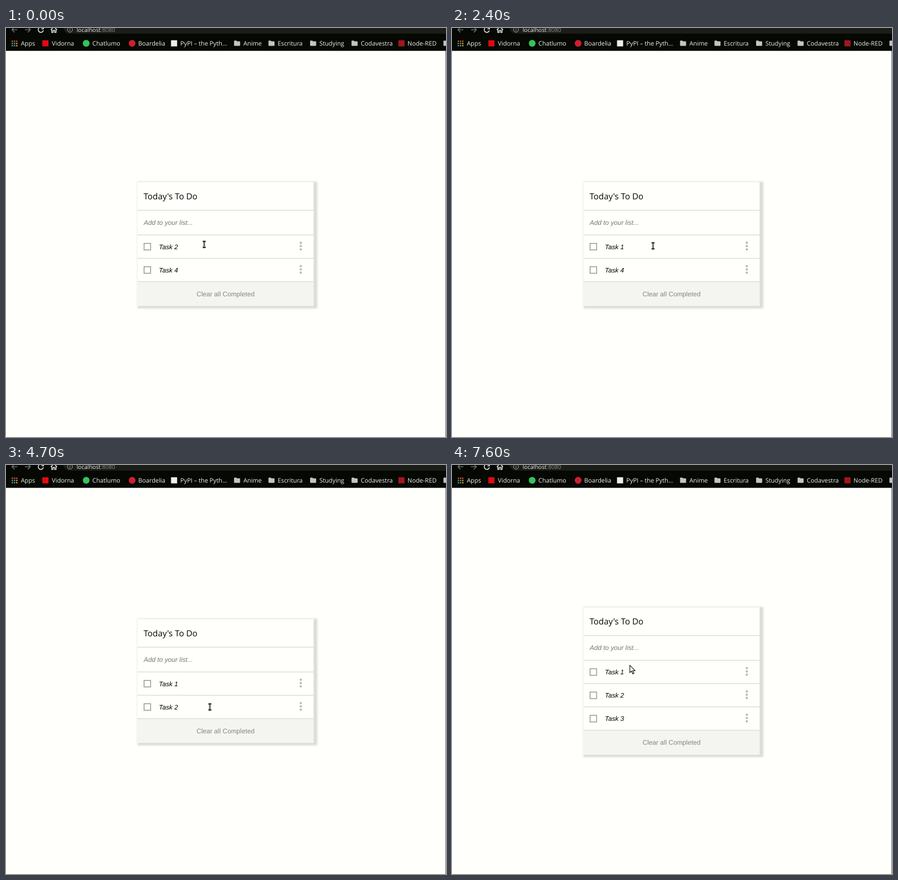
An HTML page for the animation above (8 s loop, 777x721 px).

```html
<!DOCTYPE html>
<html lang="en">
<head>
<meta charset="utf-8">
<title>To do list</title>
<style>
  html, body { margin: 0; width: 100%; height: 100%; overflow: hidden; background: #fffffb; }
  svg { display: block; width: 777px; height: 721px; }
  text { text-rendering: geometricPrecision; white-space: pre; }
  .ui { font: 500 10.8px "Open Sans", "Noto Sans", sans-serif; fill: #f2f2ee; }
  .url { font-size: 10.1px; font-weight: 400; }
  .title { font: 14.85px "Open Sans", "Noto Sans", sans-serif; }
  .item, .button { font: italic 11.67px "Liberation Sans", Arial, sans-serif; }
  .button { font-style: normal; fill: #858583; text-anchor: middle; }
  .hint { fill: #757573; }
  .shadow { fill: #dcddd9; filter: blur(1.7px); }
  .rule { fill: #dcddd9; }
  .icon { fill: #b9b9b5; }
  .box { fill: none; stroke: #94948f; stroke-width: 1.4; }
  .line { fill: none; stroke: #e6e6e2; stroke-width: 1.5; }
  .dim { stroke: #6c6d6a; }
</style>
</head>
<body>
<svg viewBox="0 0 777 721">
  <rect width="777" height="721" fill="#fffffb"/>
  <rect x="776" y="40" width="1" height="681" fill="#6b6b69"/>
  <rect width="777" height="40.3" fill="#050803"/>
  <rect x="101" y="-14" width="700" height="24" rx="12" fill="#1b1d19"/>
  <path class="line dim" d="M20 3H10.5M15-1.6L10.4 3L15 7.6M33.5 3H43M38.5-1.6L43.1 3L38.5 7.6"/>
  <path class="line" d="M64.8-.2A4.6 4.6 0 1 0 66 4.2M66.2-2V1.4H62.6"/>
  <path class="line" d="M79 3.2L84.6-2L90.2 3.2M80.8 2.5V7.7H83.2V4.2H86V7.7H88.4V2.5"/>
  <circle class="line" cx="113" cy="3" r="4.4" style="stroke:#a2a39f;stroke-width:1"/>
  <path d="M113 2.5V5.6M113 .4V1.5" stroke="#a2a39f" stroke-width="1.1"/>
  <text class="ui url" x="124.8" y="6.6">localhost<tspan fill="#92938f">:8080</tspan></text>
  <g id="bookmarks"></g>
  <g id="card"></g>
  <g id="pointer"></g>
</svg>
<script>
const LOOP = 8000, LEFT = 232.3, WIDTH = 310.9, ROW = 41.1, LIST_TOP = 364.8;
const $ = id => document.getElementById(id);
const rect = (x, y, w, h, attrs = '') =>
  `<rect x="${x}" y="${y}" width="${w}" height="${h}" ${attrs}/>`;
const label = (cls, x, y, s) => `<text class="${cls}" x="${x}" y="${y}">${s}</text>`;
const rule = y => rect(LEFT, y - 0.7, WIDTH, 1.4, 'class="rule"');

// Bookmarks bar
const folder = x =>
  `<path d="M${x} 23.2q0-1 1-1h3l1.3 1.4h4.4q1 0 1 1v6q0 1-1 1h-8.7q-1 0-1-1z" fill="#c4c5c1"/>`;
const disc = (x, color) => `<circle cx="${x}" cy="27" r="6" fill="${color}"/>`;
const square = (x, color) => rect(x, 21.6, 10.8, 10.8, `fill="${color}"`);
const appColors = ['#d9503f', '#d9503f', '#d9503f', '#45a35c', '#7a8f5a', '#d3a53a', '#45a35c', '#5b86c8', '#d3a53a'];
const apps = appColors.map((c, i) =>
  rect(10 + i % 3 * 3.9, 22.2 + Math.floor(i / 3) * 3.9, 2.4, 2.4, `fill="${c}"`)).join('');
const bookmarks = [
  [26.2, 'Apps', apps],
  [81, 'Vidorna', square(64.2, '#e00b12')],
  [152.6, 'Chatlumo', disc(141.6, '#35c45b')],
  [233.5, 'Boardelia', disc(222.7, '#cf1f30')],
  [307.8, 'PyPI – the Pyth…', square(291.4, '#eeeeea')],
  [419.2, 'Anime', folder(402.7)],
  [479.8, 'Escritura', folder(463.5)],
  [553.5, 'Studying', folder(537)],
  [626.5, 'Codavestra', folder(610.2)],
  [709, 'Node-RED', square(693, '#a3161c')],
  [790, '', folder(772.5)]
];
$('bookmarks').innerHTML = bookmarks.map(([x, s, icon]) => icon + label('ui', x, 30.7, s)).join('');

// Each step changes part of the state; pointer is [shape, x, y].
const steps = [
  [0, { tasks: ['Task 2', 'Task 4'], draft: '', caret: null, active: -1, pointer: ['beam', 350, 381.5] }],
  [200, { pointer: ['beam', 355, 384] }],
  [300, { caret: 0 }],
  [400, { active: 0 }],
  [900, { caret: null }],
  [1200, { tasks: ['Task ', 'Task 4'] }],
  [1600, { tasks: ['Task 1', 'Task 4'], caret: 0 }],
  [2300, { caret: null }],
  [2400, { active: -1 }],
  [3100, { pointer: ['beam', 355.5, 389] }],
  [3200, { pointer: ['beam', 357, 402] }],
  [3300, { pointer: ['beam', 359, 416] }],
  [3400, { pointer: ['beam', 360, 425] }],
  [3500, { pointer: ['beam', 360, 426.5], caret: 1 }],
  [3700, { active: 1 }],
  [4100, { caret: null }],
  [4300, { tasks: ['Task 1', 'Task '] }],
  [4400, { tasks: ['Task 1', 'Task 2'], caret: 1 }],
  [4700, { active: -1, caret: null }],
  [5100, { pointer: ['arrow', 357.5, 424] }],
  [5200, { pointer: ['beam', 346, 398] }],
  [5300, { pointer: ['beam', 329, 372] }],
  [5400, { pointer: ['beam', 318, 357] }],
  [5500, { pointer: ['beam', 315.5, 354.5], caret: 'draft' }],
  [5800, { pointer: ['beam', 315.5, 355] }],
  [6100, { draft: 'T' }],
  [6500, { draft: 'Ta' }],
  [6600, { draft: 'Tas' }],
  [6900, { draft: 'Task' }],
  [7000, { draft: 'Task 3' }],
  [7300, { tasks: ['Task 1', 'Task 2', 'Task 3'], draft: '', pointer: ['arrow', 314, 353.2] }],
  [7600, { caret: null }]
];

const dots = y => [-5.8, 0, 5.8].map(d =>
  `<circle class="icon" cx="520.6" cy="${y + d}" r="2.05"/>`).join('');
const bin = y => `<path class="icon" transform="translate(520.6 ${y}) scale(.97) translate(-12 -12)"
  d="M6 19c0 1.1.9 2 2 2h8c1.1 0 2-.9 2-2V7H6zM8 9h8v10H8zM15.5 4l-1-1h-5l-1 1H5v2h14V4z" fill-rule="evenodd"/>`;

function taskRow(name, i, active) {
  const top = LIST_TOP + i * ROW, mid = top + 20.7;
  return (active ? rect(LEFT, top, WIDTH, ROW, 'fill="#edf0cd"') : '') +
    rule(top) + rect(243.8, mid - 5.8, 11.6, 11.6, 'class="box"') +
    label('item', 269.9, mid + 4, name) + (active ? bin : dots)(mid - 1.1);
}

function drawCard({ tasks, draft, caret, active }) {
  const foot = LIST_TOP + tasks.length * ROW, bottom = foot + 43;
  const card = $('card');
  card.setAttribute('transform', `translate(0 ${(2 - tasks.length) * ROW / 2})`);
  card.innerHTML =
    rect(232.2, 270.8, 317.6, bottom + 4.4 - 270.8, 'class="shadow"') +
    rect(LEFT, 271.7, WIDTH, bottom - 271.7, 'fill="#fffffb"') +
    label('title', 242.9, 302, "Today's To Do") + rule(321.3) +
    label(draft ? 'item' : 'item hint', 243.2, 347, draft || 'Add to your list...') +
    tasks.map((name, i) => taskRow(name, i, i === active)).join('') +
    rect(LEFT, foot, WIDTH, 43, 'fill="#f4f5f1"') + rule(foot) +
    label('button', 387.7, foot + 25.7, 'Clear all Completed');

  if (caret === null) return;
  const texts = card.querySelectorAll('.item');
  const inDraft = caret === 'draft';
  const text = texts[inDraft ? 0 : caret + 1];
  const length = inDraft && !draft ? 0 : text.getComputedTextLength();
  card.insertAdjacentHTML('beforeend',
    rect(+text.getAttribute('x') + length - 0.1, text.getAttribute('y') - 10.3, 0.9, 12.7));
}

const beam = 'M-2.5-5.2H2.5M0-5.2V5.2M-2.5 5.2H2.5';
const shapes = {
  beam: `<path d="${beam}" stroke="#20211f" stroke-width="2.6"/><path d="M0-5V5" stroke="#c8c9c5" stroke-width=".9"/>`,
  arrow: `<path d="M0 0V12.8L3 10.1L5.2 14.9L7.3 14L5.2 9.4L9.2 9.2Z" fill="#fffffb" stroke="#1a1b19" stroke-width="1.2"/>`
};
function drawPointer([shape, x, y]) {
  $('pointer').innerHTML = `<g transform="translate(${x} ${y})">${shapes[shape]}</g>`;
}

let shown = -1;
function tick() {
  const t = performance.now() % LOOP;
  const count = steps.filter(([start]) => start <= t).length;
  if (count !== shown) {
    shown = count;
    const state = Object.assign({}, ...steps.slice(0, count).map(([, change]) => change));
    drawCard(state);
    drawPointer(state.pointer);
  }
  requestAnimationFrame(tick);
}
tick();
</script>
</body>
</html>
```
